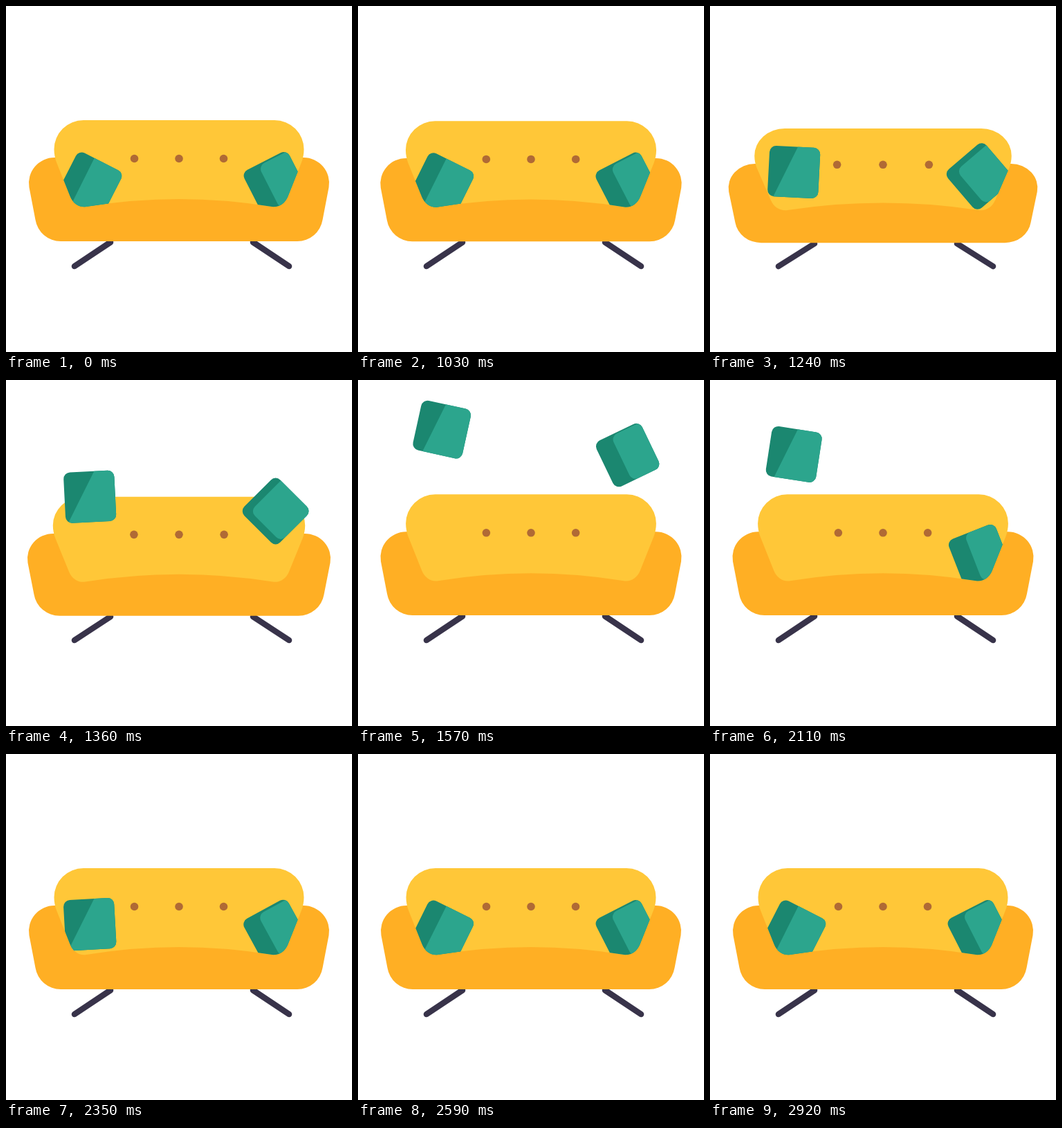
Write an HTML page with a canvas that moves like this. It is 500 by 500 pixels and loops after 2950 ms.

```html
<!DOCTYPE html>
<html lang="en">
<head>
<meta charset="utf-8">
<title>Sofa with bouncing cushions</title>
<style>
html, body { margin: 0; width: 100%; height: 100%; overflow: hidden; background: #fff; }
canvas { display: block; width: 100vw; height: 100vh; }
</style>
</head>
<body>
<canvas id="stage" width="500" height="500"></canvas>
<script>
const LOOP = 2950, HOLD = 1030, STEP = 30;
const FLOOR = 380, SIDE = 73.3, HALF = SIDE / 2, ROUND = 9.5;
const ctx = document.getElementById('stage').getContext('2d');
const colour = {
  back: '#ffc738', seat: '#ffaf24', button: '#b06a35', leg: '#38334a',
  light: '#2ca58d', dark: '#1b8770'
};

const left = {
  x: 121.2, rest: 257.5, top: 63.5,
  rise: { from: 1100, to: 1840, a: 2.5, b: 8.2 },
  fall: { from: 1840, to: 2364, a: 2.24, b: 1 },
  turns: [[1000, 27], [1340, -3], [1820, 30], [2320, -4], [2620, 27]]
};
const right = {
  x: 389.6, rest: 257, top: 108,
  rise: { from: 1100, to: 1600, a: 2.5, b: 2.85 },
  fall: { from: 1600, to: 2400, a: 2.7, b: 10.6 },
  turns: [[1000, -27], [1360, -45], [1840, 3], [2240, -29], [2600, -27]]
};

const backEdge = 'C430.5 214 429 221 427 226 L407.5 275 C403 286 394 291.5 384 290' +
  ' Q250 268 116 290 C106 291.5 97 286 92.5 275 L73 226 C71 221 69.5 214 69.5 207';
const back = new Path2D('M112 165 H388 A42.5 42 0 0 1 430.5 207 ' + backEdge + ' A42.5 42 0 0 1 112 165 Z');
const cushionSpace = new Path2D('M-100 -300 H600 V207 H430.5 ' + backEdge + ' H-100 Z');
const body = new Path2D('M70 219 H430 A37 37 0 0 1 466.5 262 L457.5 309 A37 37 0 0 1 421 340' +
  ' H79 A37 37 0 0 1 42.5 309 L33.5 262 A37 37 0 0 1 70 219 Z');
const outline = box(-HALF, -HALF, SIDE, SIDE);

function box(x, y, w, h) {
  const path = new Path2D();
  path.roundRect(x, y, w, h, ROUND);
  return path;
}

const rad = deg => deg * Math.PI / 180;
const mix = (from, to, u) => from + (to - from) * u;
const progress = (t, from, to) => Math.min(1, Math.max(0, (t - from) / (to - from)));

// Eases from 0 to 1: a softens the start, b the end.
const ease = (t, { from, to, a, b }) => 1 - (1 - progress(t, from, to) ** a) ** b;
const bump = (t, from, to) => Math.abs(Math.sin(Math.PI * progress(t, from, to))) ** 1.5;

// One squash for the launch and a softer one for the landing.
function squash(t) {
  const launch = .03 * bump(t, 1000, 1425), landing = .0125 * bump(t, 1500, 2180);
  return [1 + launch + landing, 1 - 1.9 * launch - .77 * landing];
}

// Swings from one turning point to the next.
function swing(turns, t) {
  let angle = turns[0][1];
  for (let i = 1; i < turns.length; i++) {
    const u = progress(t, turns[i - 1][0], turns[i][0]);
    angle = mix(angle, turns[i][1], (1 - Math.cos(Math.PI * u)) / 2);
  }
  return angle;
}

function pose(c, t, sy) {
  const height = ease(t, c.rise) - ease(t, c.fall);
  const seated = mix(FLOOR, c.rest, sy);
  return { x: c.x, y: mix(seated, c.top, height), angle: swing(c.turns, t) };
}

function fill(path, style) {
  ctx.fillStyle = style;
  ctx.fill(path);
}

function scaleSofa(sx, sy) {
  ctx.setTransform(sx, 0, 0, sy, 250 * (1 - sx), FLOOR * (1 - sy));
}

function drawLegs(sy) {
  scaleSofa(1, sy);
  ctx.strokeStyle = colour.leg;
  ctx.lineWidth = 8.6;
  ctx.lineCap = 'round';
  ctx.beginPath();
  for (const side of [-1, 1]) {
    ctx.moveTo(254 + side * 103, 341.3);
    ctx.lineTo(254 + side * 155, 376);
  }
  ctx.stroke();
}

function drawSofa(sx, sy) {
  drawLegs(sy);
  scaleSofa(sx, sy);
  fill(body, colour.seat);
  fill(back, colour.back);
  ctx.setTransform(1, 0, 0, 1, 0, 0);
  ctx.fillStyle = colour.button;
  for (const n of [-1, 0, 1]) {
    ctx.beginPath();
    ctx.arc(250 + n * 64.5 * sx, FLOOR - 159.5 * sy, 5.8, 0, 7);
    ctx.fill();
  }
}

// Paints the dark cushion, then the lit face inside its outline.
function drawCushion({ x, y, angle }, faceAngle, face) {
  ctx.save();
  ctx.setTransform(1, 0, 0, 1, x, y);
  ctx.rotate(rad(angle));
  fill(outline, colour.dark);
  ctx.clip(outline);
  ctx.rotate(rad(faceAngle - angle));
  fill(face, colour.light);
  ctx.restore();
}

function draw(t) {
  const [sx, sy] = squash(t);
  ctx.setTransform(1, 0, 0, 1, 0, 0);
  ctx.fillStyle = '#fff';
  ctx.fillRect(0, 0, 500, 500);
  drawSofa(sx, sy);

  ctx.save();
  scaleSofa(sx, sy);
  ctx.clip(cushionSpace);

  drawCushion(pose(left, t, sy), 26.5, box(-11, -100, 200, 200));

  // The lit face slides over the cushion as it tips to the left.
  const r = pose(right, t, sy);
  const tip = Math.max(0, -r.angle - 22);
  const insetX = 27 - .031 * tip * tip, insetY = .47 * tip;
  drawCushion(r, r.angle, box(insetX - HALF, insetY - HALF, 110, SIDE - insetY));
  ctx.restore();
}

const start = performance.now();
function tick() {
  const t = (performance.now() - start) % LOOP;
  draw(t < HOLD ? 0 : HOLD + Math.floor((t - HOLD) / STEP) * STEP);
  requestAnimationFrame(tick);
}
tick();
</script>
</body>
</html>
```
